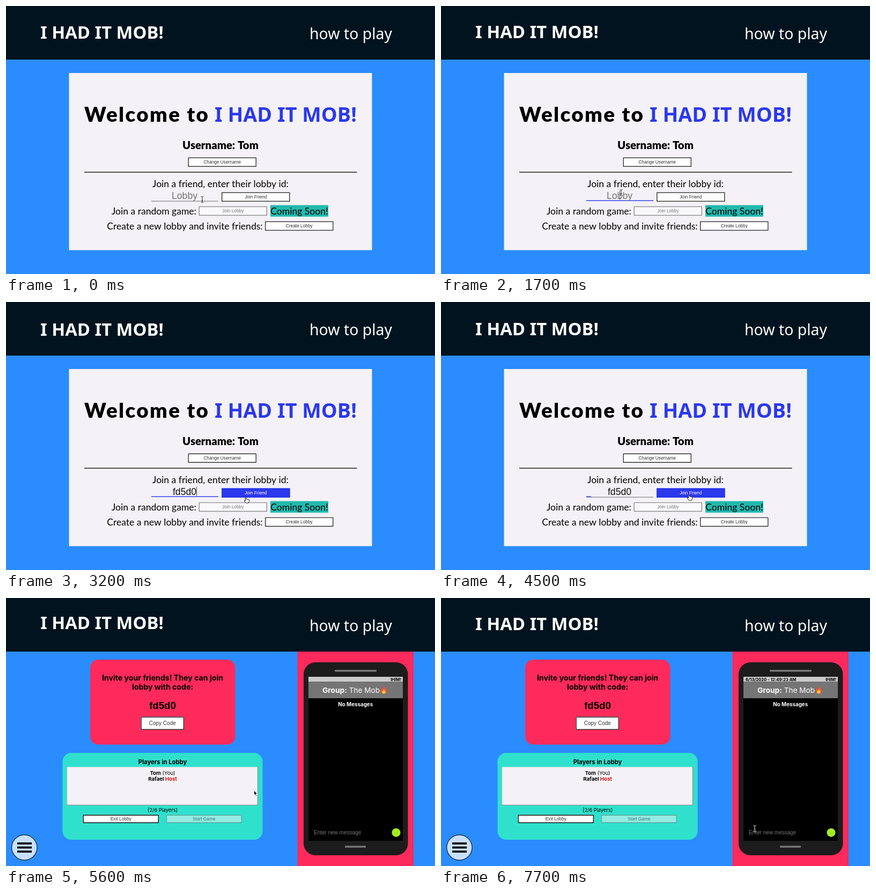
An HTML page with a canvas for the animation above (7.8 s loop, 800 by 500 pixels).

```html
<!DOCTYPE html>
<html lang="en">
<head>
<meta charset="utf-8">
<title>Lobby</title>
<style>
  html, body { margin: 0; width: 100%; height: 100%; overflow: hidden; background: #2a8cff; }
  canvas { display: block; width: 800px; height: 500px; }
</style>
</head>
<body>
<canvas id="stage" width="800" height="500"></canvas>
<script>
const ctx = document.getElementById('stage').getContext('2d');

const LOOP = 7800;
const FOCUS = 1230, PASTE = 2200, BLUR = 4207, OPEN = 5100, CLOCK = 6100;
const GAME = 'I HAD IT MOB!';
const USER = 'Tom';
const NOTO = '"Noto Sans", sans-serif';
const LATO = 'Lato, sans-serif';
const ARIAL = '"Liberation Sans", Arial, sans-serif';
const INTER = 'Inter, sans-serif';
const BLUE = '#2b38ec', PINK = '#fd2a5b', PAPER = '#f4f2f6';

// time, x, y of the pointer tip
const PATH = [
  [0, 366, 361], [300, 366, 361], [1050, 336, 348], [2400, 336, 348],
  [3000, 447, 364], [3600, 447, 364], [4150, 462, 359], [6750, 463, 359],
  [7500, 585, 430], [LOOP, 585, 430]
];

const clamp = v => Math.max(0, Math.min(1, v));
const smooth = v => v * v * (3 - 2 * v);

function rect(x, y, w, h, color) {
  ctx.fillStyle = color;
  ctx.fillRect(x, y, w, h);
}

function round(x, y, w, h, r, color) {
  ctx.fillStyle = color;
  ctx.beginPath();
  ctx.roundRect(x, y, w, h, r);
  ctx.fill();
}

function disc(x, y, r, color) {
  ctx.fillStyle = color;
  ctx.beginPath();
  ctx.arc(x, y, r, 0, Math.PI * 2);
  ctx.fill();
}

function text(str, x, y, font, color = '#000', align = 'center', spacing = 0) {
  ctx.font = font;
  ctx.letterSpacing = spacing + 'px';
  ctx.fillStyle = color;
  ctx.textAlign = align;
  ctx.fillText(str, x, y);
}

// two differently styled runs, centred together
function pair(a, fontA, b, fontB, x, y, colorA, colorB) {
  ctx.letterSpacing = '0px';
  ctx.font = fontA;
  const wa = ctx.measureText(a).width;
  ctx.font = fontB;
  const left = x - (wa + ctx.measureText(b).width) / 2;
  text(a, left, y, fontA, colorA, 'left');
  text(b, left + wa, y, fontB, colorB, 'left');
}

function button(label, x, y, w, h, o = {}) {
  const { fill = '#fff', line = '#333', ink = '#333', size = 8.33 } = o;
  rect(x, y, w, h, fill);
  ctx.strokeStyle = line;
  ctx.lineWidth = 1.4;
  ctx.strokeRect(x + 0.7, y + 0.7, w - 1.4, h - 1.4);
  text(label, x + w / 2, y + h / 2 + size * 0.35, `${size}px ${ARIAL}`, ink);
}

function pointer(t) {
  let i = 1;
  while (i < PATH.length - 1 && t > PATH[i][0]) i++;
  const [t0, x0, y0] = PATH[i - 1], [t1, x1, y1] = PATH[i];
  const k = smooth(clamp((t - t0) / (t1 - t0)));
  return { x: x0 + (x1 - x0) * k, y: y0 + (y1 - y0) * k };
}

const inside = (p, x, y, w, h) => p.x >= x && p.x <= x + w && p.y >= y && p.y <= y + h;

function beam(x, y) {
  const shape = () => {
    ctx.beginPath();
    ctx.moveTo(x - 2.5, y - 5.5);
    ctx.quadraticCurveTo(x, y - 5.5, x, y - 4);
    ctx.quadraticCurveTo(x, y - 5.5, x + 2.5, y - 5.5);
    ctx.moveTo(x, y - 4);
    ctx.lineTo(x, y + 4);
    ctx.moveTo(x - 2.5, y + 5.5);
    ctx.quadraticCurveTo(x, y + 5.5, x, y + 4);
    ctx.quadraticCurveTo(x, y + 5.5, x + 2.5, y + 5.5);
    ctx.moveTo(x - 1.5, y + 2);
    ctx.lineTo(x + 1.5, y + 2);
    ctx.stroke();
  };
  ctx.strokeStyle = 'rgba(255,255,255,.8)';
  ctx.lineWidth = 2.2;
  shape();
  ctx.strokeStyle = '#222';
  ctx.lineWidth = 1;
  shape();
}

function outline(x, y, points, fill, line) {
  ctx.beginPath();
  points.forEach(([px, py]) => ctx.lineTo(x + px, y + py));
  ctx.closePath();
  ctx.lineJoin = 'round';
  ctx.strokeStyle = line;
  ctx.lineWidth = 1;
  ctx.fillStyle = fill;
  ctx.fill();
  ctx.stroke();
}

const arrow = (x, y) => outline(x, y,
  [[0, 0], [0, 9], [2, 7.2], [3.4, 10.4], [4.9, 9.7], [3.5, 6.7], [6.2, 6.5]], '#000', '#fff');

const hand = (x, y) => outline(x, y,
  [[-0.8, 0], [0.8, 0], [1.2, 4], [3, 3.8], [4.8, 4.5], [6.4, 5.2], [6.5, 8],
   [5.3, 11], [0.4, 11], [-3, 6.8], [-2.2, 5.8], [-0.6, 7]], '#fff', '#222');

function header(t) {
  rect(0, 0, 800, 100, '#00131f');
  const bob = -4.6 * Math.cos((t - 5330) / 3000 * Math.PI * 2);
  text(GAME, 64, 61.4 + bob, `700 32.7px ${NOTO}`, '#fff', 'left');
  text('how to play', 643, 61.6, `28.4px ${NOTO}`, '#fff');
}

function lobbyField(t) {
  const filled = t >= PASTE;
  const focused = t >= FOCUS && t < BLUR;
  const width = 125 * (smooth(clamp((t - FOCUS) / 350)) - smooth(clamp((t - BLUR) / 350)));
  if (!focused) rect(271, 363.6, 125, 1.1, '#777');
  rect(271, 362.4, width, 1.4, BLUE);
  text(filled ? 'fd5d0' : 'Lobby', 333, 360, `17.6px ${ARIAL}`, filled ? '#111' : '#757575');
  const since = t - (filled ? PASTE : FOCUS);
  if (focused && since % 1000 < 500) {
    rect(filled ? 355 : 333, 344.5, 1, 17, '#444');
  }
}

function welcome(t, p) {
  const line = `17.55px ${LATO}`;
  rect(117.5, 125, 565, 330.5, PAPER);
  text('Welcome to', 146, 216, `900 38.5px ${LATO}`, '#000', 'left', 2.4);
  text(GAME, 389, 216, `700 37.7px ${NOTO}`, BLUE, 'left');
  text('Username: ' + USER, 400, 267, `900 20.3px ${LATO}`);
  button('Change Username', 339.5, 282.5, 127.5, 17.5);
  rect(146, 309.4, 508.5, 1.4, '#111');

  text('Join a friend, enter their lobby id:', 400, 338, line);
  lobbyField(t);
  const hover = inside(p, 402, 347, 127, 18);
  button('Join Friend', 402, 347.5, 127.5, 17.5,
    hover ? { fill: BLUE, line: BLUE, ink: '#fff' } : {});

  text('Join a random game:', 276, 389, line);
  button('Join Lobby', 359.5, 373.7, 127.5, 17.5, { line: '#8c8c8e', ink: '#777', fill: '#f9f8fa' });
  rect(493, 371.5, 108, 21.5, '#22b9ae');
  text('Coming Soon!', 547, 389, line);

  text('Create a new lobby and invite friends:', 333.5, 417, line);
  button('Create Lobby', 483, 401.7, 127.5, 17.5);

  if (hover) hand(p.x, p.y);
  else if (inside(p, 271, 342, 125, 23)) beam(p.x, p.y);
  else arrow(p.x, p.y);
}

function invite() {
  const bold = `700 14.15px ${INTER}`;
  round(157, 115, 270.5, 158.5, 15, PINK);
  text('Invite your friends! They can join', 292, 154, bold);
  text('lobby with code:', 292, 171, bold);
  text('fd5d0', 292, 207, `700 18.7px ${ARIAL}`);
  button('Copy Code', 251.5, 221.5, 80.5, 24.5, { size: 10 });
}

function players() {
  round(105.5, 289, 373, 162, 16, '#2fe1cd');
  text('Players in Lobby', 292, 310, `700 11.3px ${INTER}`);
  rect(113.5, 315, 356.5, 72, '#8d9996');
  rect(113.5, 315, 355, 70.5, '#d9e3e4');
  rect(115, 316.5, 353.5, 69, PAPER);
  const bold = `700 9.6px ${INTER}`;
  pair(USER, bold, ' (You)', `9.6px ${INTER}`, 292, 330, '#000', '#000');
  pair('Rafael ', bold, 'Host', bold, 292, 341, '#000', '#d30f1c');
  text('[2/6 Players]', 292, 399, `9.2px ${INTER}`);
  button('Exit Lobby', 143.5, 404.5, 141.5, 15.5, { line: '#111' });
  button('Start Game', 298.5, 404.5, 141.5, 15.5, { fill: '#92ece1', line: '#53a69b', ink: '#417a74' });
}

function menu() {
  disc(34.3, 465.5, 24.2, '#10161d');
  disc(34.3, 465.5, 23.1, '#c8e0ff');
  for (let i = 0; i < 3; i++) rect(21, 456 + i * 7.6, 27, 3.8, '#000');
}

function flame(x, y) {
  const lick = (s, color) => {
    ctx.fillStyle = color;
    ctx.beginPath();
    ctx.moveTo(x, y - 15 * s);
    ctx.bezierCurveTo(x + 1, y - 10 * s, x + 6 * s, y - 9 * s, x + 5.5 * s, y - 4 * s);
    ctx.bezierCurveTo(x + 5 * s, y + 1.2 * s, x - 5 * s, y + 1.2 * s, x - 5.8 * s, y - 4 * s);
    ctx.bezierCurveTo(x - 6 * s, y - 7 * s, x - 4.5 * s, y - 8 * s, x - 4 * s, y - 10 * s);
    ctx.bezierCurveTo(x - 3 * s, y - 7 * s, x, y - 9 * s, x, y - 15 * s);
    ctx.fill();
  };
  lick(1, '#f4542b');
  lick(0.58, '#ffc83d');
}

function phone(t) {
  rect(543.5, 100, 216.5, 400, PINK);
  round(555, 120, 194.5, 360, 22, '#1c1c1c');
  round(613, 134, 78, 3.6, 1, '#777');
  round(632, 462.3, 39, 3.4, 1, '#777');
  rect(564, 147, 176, 306, '#000');
  rect(564, 147, 176, 9.5, '#cacaca');
  rect(564, 156.5, 176, 30.5, '#757575');

  const small = `700 7.7px ${INTER}`;
  if (t >= CLOCK) {
    const sec = 22 + Math.floor((t - CLOCK) / 1000);
    text(`6/13/2020 - 12:49:${sec} AM`, 568, 154.6, small, '#000', 'left');
  }
  text('IHIM!', 737, 154.6, small, '#000', 'right');
  pair('Group:', `700 13.8px ${INTER}`, ' The Mob', `13.6px ${INTER}`, 643.5, 177, '#fff', '#fff');
  flame(704.5, 178.5);
  text('No Messages', 651.7, 202, `700 9.8px ${INTER}`, '#fff');

  text('Enter new message', 574, 441, `10px ${ARIAL}`, '#757575', 'left');
  disc(727.5, 437.7, 8, '#a3f01f');
  ctx.strokeStyle = '#7cc414';
  ctx.lineWidth = 0.8;
  ctx.beginPath();
  ctx.moveTo(723.5, 438.5);
  ctx.quadraticCurveTo(727, 441, 731.5, 436.5);
  ctx.stroke();
}

function lobby(t, p) {
  invite();
  players();
  menu();
  phone(t);
  if (inside(p, 566, 420, 150, 30)) beam(p.x, p.y);
  else arrow(p.x, p.y);
}

function draw(now) {
  const t = now % LOOP;
  const p = pointer(t);
  rect(0, 0, 800, 500, '#2a8cff');
  header(t);
  (t < OPEN ? welcome : lobby)(t, p);
}

let start;
function tick(now) {
  if (start === undefined) start = now;
  draw(now - start);
  requestAnimationFrame(tick);
}
requestAnimationFrame(tick);
</script>
</body>
</html>
```
